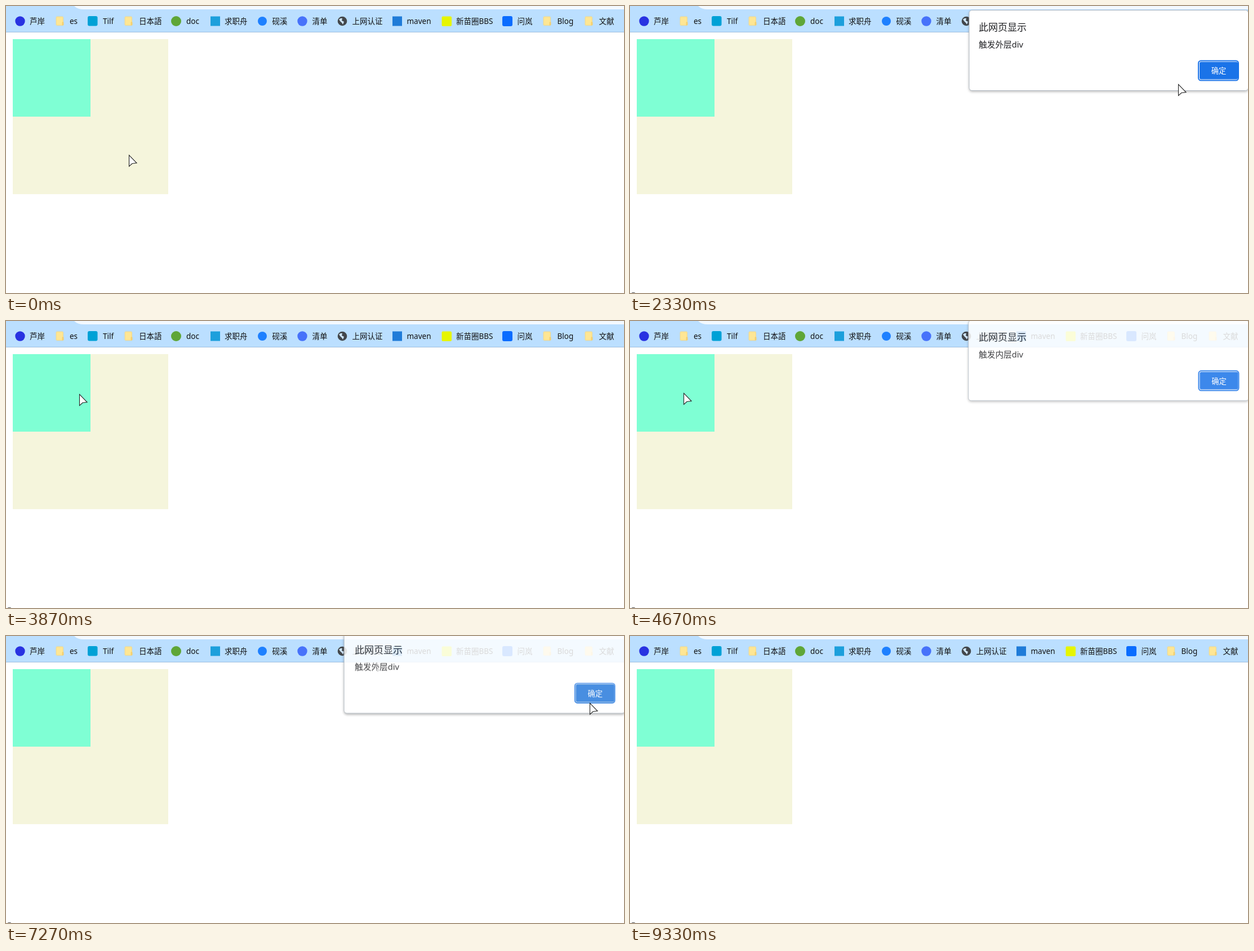
Recreate the animation shown at these times as an HTML page. Size 1097 px wide and 511 px high, loop 9.67 s.

```html
<!DOCTYPE html>
<html lang="zh">
<head>
<meta charset="utf-8">
<title>div click</title>
<style>
  html, body { margin: 0; width: 100%; height: 100%; overflow: hidden; background: #fff; }
  svg { display: block; width: 100%; height: 100%; }
  text { font-family: "Noto Sans", "Noto Sans CJK SC", "Noto Sans CJK JP", sans-serif; fill: #111; }
  .mark { font-size: 13.5px; }
  .title { font-size: 17px; fill: #202124; }
  .message { font-size: 14.7px; fill: #202124; }
  .label { font-size: 13.3px; fill: #fff; text-anchor: middle; }
  .card { fill: #fff; stroke: #b4bcc4; filter: drop-shadow(0 2px 2px rgba(0, 0, 0, .25)); }
</style>
</head>
<body>
<svg viewBox="0 0 1097 511">
  <rect width="1097" height="46" fill="#bbdfff"/>
  <path d="M121 0Q127 6 138 6H1097V0Z" fill="#f3f9ff"/>
  <rect y="46" width="1097" height="1" fill="#9dbfdf"/>
  <g id="bar"></g>
  <rect x="12" y="59" width="276" height="276" fill="#f5f5dc"/>
  <rect x="12" y="59" width="138" height="138" fill="#7fffd4"/>
  <path id="speck" d="M3 511Q6 509.4 9 511" fill="none" stroke="#444"/>
  <g id="dialogs"></g>
  <path id="cursor" d="M.5 .5V20.5L6 15.5L14 14.5Z" fill="#fff" stroke="#222" stroke-width="1.1"/>
</svg>
<script>
const $ = id => document.getElementById(id);
const LOOP = 9670, STEP = 1000 / 15;

// Bookmarks: label, label x, icon
const square = (x, y, size, color, r = 2) =>
  `<rect x="${x}" y="${y}" width="${size}" height="${size}" rx="${r}" fill="${color}"/>`;
const circle = (x, r, color) => `<circle cx="${x}" cy="27" r="${r}" fill="${color}"/>`;
const folder = x =>
  `<rect x="${x}" y="19" width="12.5" height="15.5" rx="1.5" fill="#fee694" stroke="#f0d384" stroke-width=".8"/>
   <path d="M${x + 10.5} 34.5v-5l1 -1.5h1l1 1.5v4q0 1 -1 1z" fill="#f3d073"/>`;
const globe = x => circle(x, 8.3, "#43474b") +
  `<path d="M${x - 6} 24q3 -3 6 -2l-1 4 4 2 -2 5q-2 -4 -4 -5z" fill="#cfe6fb"/>`;

const bookmarks = [
  ["芦岸", 42, circle(25, 8.7, "#2932e1")],
  ["es", 113, folder(89)],
  ["Tilf", 172, square(145, 18, 17.5, "#00a1d6", 3)],
  ["日本語", 236, folder(211)],
  ["doc", 320, circle(302, 9, "#5fa637")],
  ["求职舟", 388, square(363, 18.5, 17, "#1c9fdc", 0)],
  ["砚溪", 472.5, circle(455, 8, "#1e80ff")],
  ["清单", 543.5, circle(526, 8.7, "#4772fa")],
  ["上网认证", 614.5, globe(597)],
  ["maven", 711.5, square(686, 18.5, 17, "#1f7bd8", 0)],
  ["新苗圈BBS", 799, square(773.5, 18.5, 17.5, "#e6f500")],
  ["问岚", 907.5, square(881, 18, 18, "#0a6cff", 3)],
  ["Blog", 978.5, folder(954)],
  ["文献", 1052.5, folder(1028)]
];
$("bar").innerHTML = bookmarks.map(([label, x, icon]) =>
  `${icon}<text class="mark" x="${x}" y="32">${label}</text>`).join("");

// Dialogs: opening time, click time, message
const dialogs = [
  [1130, 2800, "触发外层div"],
  [4600, 7130, "触发内层div"],
  [7270, 8330, "触发外层div"]
];
$("dialogs").innerHTML = dialogs.map(([, , message]) => `<g>
  <rect class="card" y="7.5" height="143" rx="5"/>
  <text class="title" x="619" y="44">此网页显示</text>
  <text class="message" x="619" y="73.5">${message}</text>
  <g class="button">
    <rect class="ring" x="1009" y="97.5" width="71" height="35" rx="4.5" stroke-width="2"/>
    <rect class="face" x="1011" y="99.5" width="68" height="31" rx="2.5"/>
    <text class="label" x="1045" y="120.3">确定</text>
  </g></g>`).join("");
const views = [...$("dialogs").children].map(root => {
  const part = name => root.querySelector("." + name);
  return { root, card: part("card"), button: part("button"), ring: part("ring"), face: part("face") };
});

// Cursor tip: time, x, y
const path = [
  [0, 218, 265], [270, 212, 253], [470, 205, 267], [670, 205, 267], [930, 186, 269],
  [1470, 186, 269], [2530, 1054, 126], [3000, 1054, 126], [3730, 161, 131], [4200, 95, 128],
  [5070, 95, 128], [6070, 630, 91], [6470, 742, 83], [7070, 1036, 119],
  [8400, 1036, 119], [9270, 82, 506], [9330, 60, 530], [LOOP, 60, 530]
];

// Monotone cubic through the points: smooth, without overshoot
const slope = (i, c) => path[i] && path[i + 1]
  ? (path[i + 1][c] - path[i][c]) / (path[i + 1][0] - path[i][0]) : 0;
function tangent(i, c) {
  const a = slope(i - 1, c), b = slope(i, c);
  return a * b > 0 ? 2 * a * b / (a + b) : 0;
}
function along(t, c) {
  const i = Math.max(0, path.findIndex(p => p[0] > t) - 1);
  const p = path[i], q = path[i + 1], d = q[0] - p[0], u = (t - p[0]) / d, v = 1 - u;
  return p[c] * v * v * (1 + 2 * u) + q[c] * u * u * (3 - 2 * u)
    + d * u * v * (tangent(i, c) * v - tangent(i + 1, c) * u);
}

const RISE = 19.5;
function lift(t, open, click) {
  if (t < open) return RISE;
  if (t > click) return Math.min(RISE, (t - click) * 0.09);
  return Math.max(0, (open + 200 - t) / 15);
}

function draw(t) {
  const x = along(t, 1), y = along(t, 2);
  $("cursor").setAttribute("transform", `translate(${Math.round(x)} ${Math.round(y)})`);
  $("speck").setAttribute("opacity", t < 70 ? 0 : 1);
  const hover = x > 1009 && x < 1081 && y > 97 && y < 133;
  dialogs.forEach(([open, click], i) => {
    const { root, card, button, ring, face } = views[i];
    const k = lift(t, open, click), pressed = t > click;
    const color = pressed ? "#2376c3" : hover ? "#2b7de9" : "#1a73e8";
    root.setAttribute("opacity", 1 - (k / RISE) ** 2.3);
    root.setAttribute("transform", `translate(0 ${-k})`);
    card.setAttribute("x", 602 - k / 7);
    card.setAttribute("width", 495.5 + k / 4);
    button.setAttribute("transform", `translate(${k / 18} 0)`);
    face.setAttribute("fill", color);
    ring.setAttribute("fill", pressed ? color : "#fff");
    ring.setAttribute("stroke", pressed ? "none" : "#1a73e8");
  });
}

// The picture moves 15 times a second, on a 10 ms clock
function tick() {
  const n = Math.floor((performance.now() % LOOP) / STEP + 0.052);
  draw(Math.min(LOOP - 10, Math.round(n * STEP / 10) * 10));
  requestAnimationFrame(tick);
}
tick();
</script>
</body>
</html>
```
